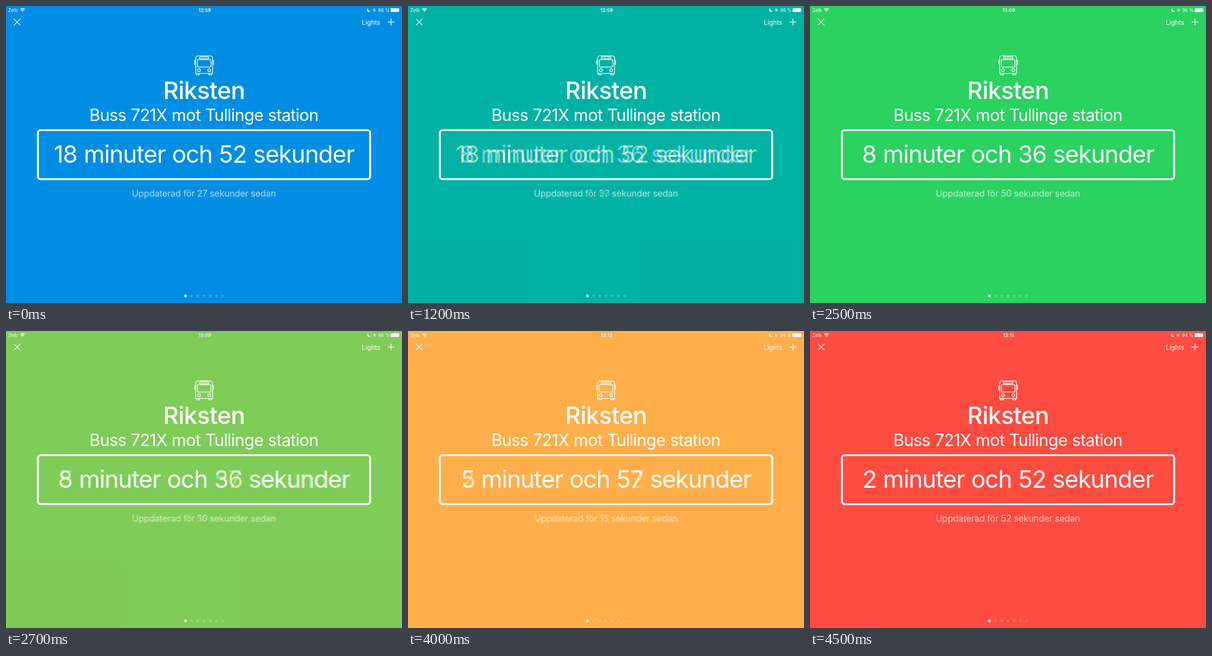
Animation, 864 px wide and 648 px high, one loop 5500 ms. Source, as an HTML page:

```html
<!DOCTYPE html>
<html lang="sv">
<head>
<meta charset="utf-8">
<title>Avgångar</title>
<style>
  html, body { margin: 0; width: 100%; height: 100%; overflow: hidden; }
  svg { position: absolute; left: 0; top: 0; width: 864px; height: 648px; }
  text {
    fill: #fff;
    font-family: Inter, Roboto, sans-serif;
    font-optical-sizing: none;
    white-space: pre;
  }
  .mid { text-anchor: middle; }
  .end { text-anchor: end; }
  .status { font-size: 10px; }
  .clock { font-size: 10px; font-weight: 600; letter-spacing: .2px; }
  .button { font-size: 14px; }
  .stop { font-size: 52.5px; font-weight: 500; letter-spacing: -.9px; }
  .line { font-size: 36.5px; letter-spacing: -.9px; word-spacing: .7px; }
  .count { font-size: 52.5px; letter-spacing: -1.4px; word-spacing: 1px; }
  .updated { font-size: 19.6px; letter-spacing: -.29px; opacity: .68; }
  .stroke { fill: none; stroke: #fff; }
  .solid { fill: #fff; }
</style>
</head>
<body>
<script>
const LOOP = 5500, HOLD = 1000, FADE = 500;

const scenes = [
  { color: '#008ee4', clock: '12:59', battery: 96, shift: 0, left: '18 minuter och 52 sekunder', age: 27 },
  { color: '#00d665', clock: '13:09', battery: 95, shift: .8, left: '8 minuter och 36 sekunder', age: 50 },
  { color: '#ffc24d', clock: '13:12', battery: 94, shift: 0, left: '5 minuter och 57 sekunder', age: 15 },
  { color: '#ff4c41', clock: '13:15', battery: 94, shift: 0, left: '2 minuter och 52 sekunder', age: 52 },
];

const label = (cls, x, y, str) => `<text class="${cls}" x="${x}" y="${y}">${str}</text>`;

const wifi = `
  <g class="stroke" stroke-width="1.5">
    <path d="M31 7.6 Q36 3.2 41 7.6"/>
    <path d="M33 9.7 Q36 7.1 39 9.7"/>
  </g>
  <path class="solid" d="M34.3 11 Q36 9.7 37.7 11 L36 12.8 Z"/>`;

const battery = `
  <rect class="solid" x="839" y="5" width="18.5" height="8" rx="1.6"/>
  <path class="solid" d="M858.1 7.6 q1.2 1.4 0 2.8 z"/>`;

const bus = `
  <g class="stroke" stroke-width="1.6">
    <path d="M413.8 147.2 V114 Q413.8 108.8 419 108.8 H445.4 Q450.6 108.8 450.6 114 V147.2 Z" stroke-linejoin="round"/>
    <rect x="422" y="111" width="20.6" height="3.8" rx="1.9" stroke-width="1.5"/>
    <rect x="417.6" y="117" width="29.4" height="16.2" rx="2.2" stroke-width="1.5"/>
    <circle cx="420.9" cy="140" r="3.1" stroke-width="1.5"/>
    <circle cx="443.5" cy="140" r="3.1" stroke-width="1.5"/>
    <path d="M413.8 118.4 H413 Q411.6 118.4 411.6 120 V128.2 M450.6 118.4 H451.4 Q452.8 118.4 452.8 120 V128.2"/>
    <path d="M415.2 147.2 V149 Q415.2 150.2 416.4 150.2 H421 Q422.2 150.2 422.2 149 V147.2
             M442.2 147.2 V149 Q442.2 150.2 443.4 150.2 H448 Q449.2 150.2 449.2 149 V147.2"/>
  </g>`;

const dots = Array.from({ length: 7 }, (_, i) =>
  `<circle class="solid" cx="${391.5 + 13.5 * i}" cy="632.5" r="2.95" opacity="${i ? .2 : 1}"/>`).join('');

const draw = s => `
  <svg viewBox="0 0 864 648">
    <rect width="864" height="648" fill="${s.color}"/>
    ${label('status', 5, 12.6, 'Zelb')}
    ${wifi}
    ${label('clock mid', 433.6, 12.6, s.clock)}
    <g transform="translate(${s.shift} 0)">
      <path class="solid" d="M790 4.8 A4.2 4.2 0 1 0 795.4 10.8 A4.6 4.6 0 0 1 790 4.8 Z"/>
      <circle class="solid" cx="803.3" cy="9" r="3.2" opacity=".5"/>
    </g>
    ${label('status end', 836.9, 12.6, s.battery + ' %')}
    ${battery}
    <path class="stroke" stroke-width="1.5" d="M17.3 28 L31.3 42 M31.3 28 L17.3 42 M832.5 35 H847.5 M840 27.5 V42.5"/>
    ${label('button end', 816.5, 40.8, 'Lights')}
    ${bus}
    ${label('stop mid', 432, 203, 'Riksten')}
    ${label('line mid', 431.6, 251, 'Buss 721X mot Tullinge station')}
    <rect class="stroke" x="69.6" y="271" width="724.9" height="106.8" rx="6" stroke-width="4.2"/>
    ${label('count mid', 432, 342.4, s.left)}
    ${label('updated mid', 431.8, 416.3, `Uppdaterad för ${s.age} sekunder sedan`)}
    ${dots}
  </svg>`;

document.body.innerHTML = scenes.map(draw).join('');

// Each later scene fades in over the previous one in sixths, then stays until the loop restarts.
document.querySelectorAll('svg').forEach((svg, i) => {
  if (!i) return;
  const start = HOLD + (i - 1) * (HOLD + FADE);
  const fade = svg.animate([
    { offset: 0, opacity: 0 },
    { offset: start / LOOP, opacity: 0, easing: 'steps(5, jump-both)' },
    { offset: (start + FADE) / LOOP, opacity: 1 },
    { offset: 1, opacity: 1 },
  ], { duration: LOOP, iterations: Infinity });
  fade.startTime = document.timeline.currentTime;
});
</script>
</body>
</html>
```
